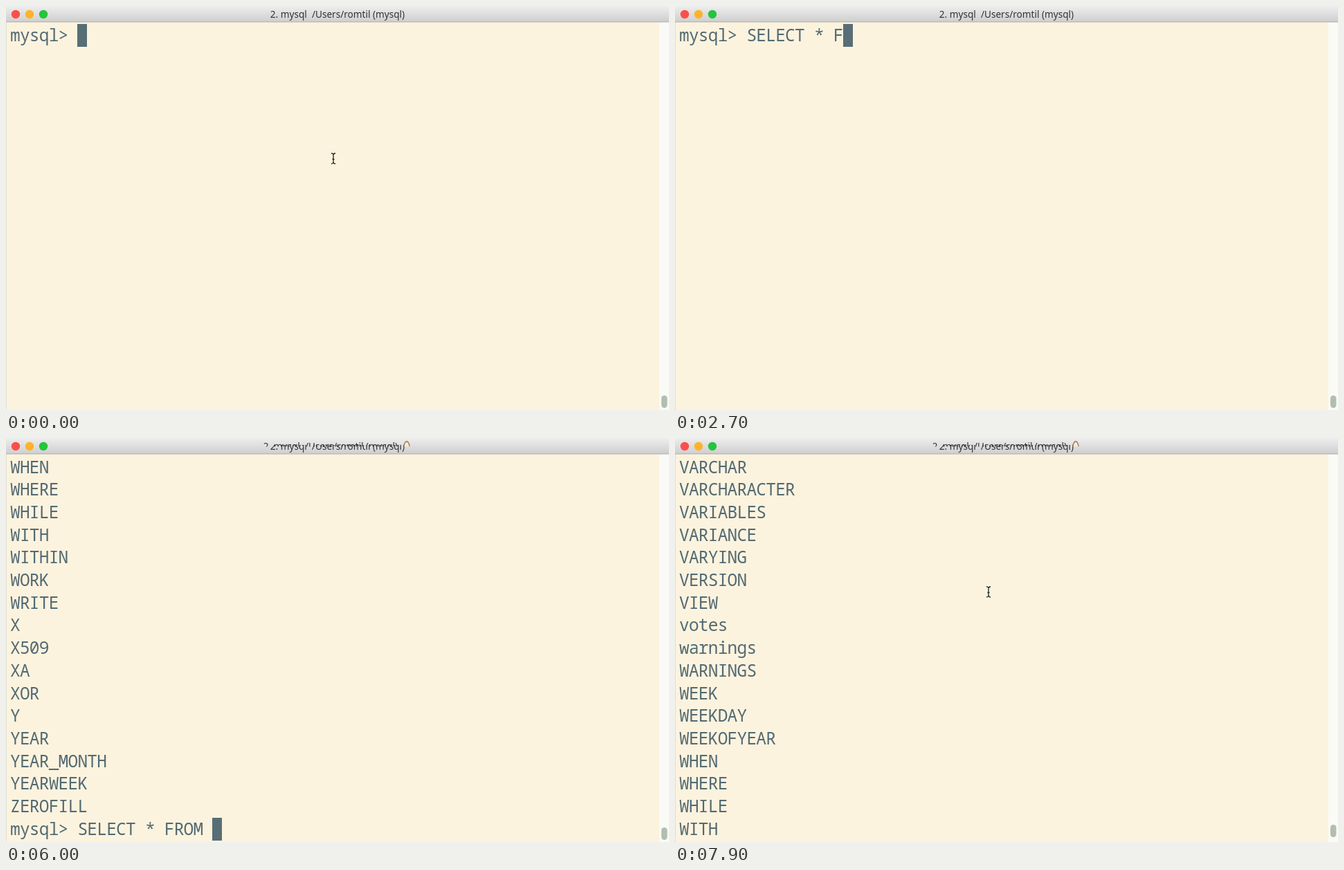
Recreate the animation shown at these times as an HTML page. Size 958 by 584 pixels, loop 8 s.

```html
<!DOCTYPE html>
<html lang="en">
<head>
<meta charset="utf-8">
<title>Terminal</title>
<style>
  html, body { margin: 0; width: 100%; height: 100%; overflow: hidden; background: #fcf3de; }
  svg { display: block; width: 958px; height: 584px; }
  text { white-space: pre; }
  .row { font: 24.5px "Noto Sans Mono", "DejaVu Sans Mono", monospace; letter-spacing: -.78px; fill: #536a73; }
  .title { font: 13.6px "Noto Sans", "Open Sans", sans-serif; fill: #333; text-anchor: middle; }
</style>
</head>
<body>
<svg viewBox="0 0 958 584">
  <defs>
    <linearGradient id="bar" x2="0" y2="1">
      <stop offset="0" stop-color="#eeeeee"/>
      <stop offset="1" stop-color="#cecece"/>
    </linearGradient>
    <clipPath id="upper"><rect x="360" width="230" height="12.5"/></clipPath>
    <clipPath id="lower"><rect x="360" y="10" width="230" height="12"/></clipPath>
  </defs>
  <rect width="958" height="584" fill="#fcf3de"/>
  <rect x="944" y="23" width="14" height="561" fill="#fafaf7"/>
  <rect y="23" width="1" height="561" fill="#dedfd2"/>
  <rect id="thumb" x="947" y="563" width="8.5" height="18" rx="4.2" fill="#b3bfae"/>
  <rect width="958" height="23" fill="url(#bar)"/>
  <rect y="22.5" width="958" height="1" fill="#adadaa"/>
  <circle cx="14" cy="12" r="6.2" fill="#fb4f4b"/>
  <circle cx="34" cy="12" r="6.2" fill="#fdb32a"/>
  <circle cx="54" cy="12" r="6.2" fill="#25c53c"/>
  <text id="plain" class="title" x="479" y="16.5">2. mysql  /Users/romtil (mysql)</text>
  <g id="belled">
    <g clip-path="url(#upper)"><text class="title" x="469" y="16.5">2. mysql  /Users/romtil (mysql)</text></g>
    <g clip-path="url(#lower)"><text class="title" x="479" y="16.5">2. mysql  /Users/romtil (mysql)</text></g>
    <path d="M574.5 12C576 10 575.5 5 579 5S582 10 583.5 12" fill="#f6e9d8" stroke="#a5703f" stroke-width="1.3"/>
  </g>
  <g id="rows"></g>
  <rect id="caret" width="14" height="33" fill="#586e76"/>
  <path id="mouse" d="M-3-7.5Q0-7.5 0-5Q0-7.5 3-7.5M0-5V5M-3 7.5Q0 7.5 0 5Q0 7.5 3 7.5M-1.5 1H1.5" fill="none" stroke="#222" stroke-width="1.3"/>
</svg>
<script>
const LOOP = 8000, LEFT = 6, CELL = 13.92, LINE = 32.7, ROWS = 17;
const PROMPT = 'mysql> ', QUERY = 'SELECT * FROM ';
const ASK = 'Display all 871 possibilities? (y or n) ';
const WORDS = ('VARCHAR VARCHARACTER VARIABLES VARIANCE VARYING VERSION VIEW votes warnings ' +
  'WARNINGS WEEK WEEKDAY WEEKOFYEAR WHEN WHERE WHILE WITH WITHIN WORK WRITE X X509 XA XOR ' +
  'Y YEAR YEAR_MONTH YEARWEEK ZEROFILL').split(' ');

// [time, value] steps, each held until the next
const TYPED = [[0, 0], [500, 1], [600, 2], [800, 3], [900, 4], [1000, 5], [1100, 6], [1300, 7],
  [2400, 8], [2500, 9], [2700, 10], [2900, 12], [3100, 13], [3200, 14]];
const SCROLL = [[0, 0], [7500, 2], [7600, 5], [7700, 9], [7800, 11], [7900, 13]];
const BELL = 3500, ASKED = 4200, LISTED = 5800, MOVE = 6800, REST = 7200;

const $ = id => document.getElementById(id);
const show = (id, on) => { $(id).style.display = on ? '' : 'none'; };
const held = (steps, t) => steps.reduce((v, [at, next]) => t >= at ? next : v, 0);

const lines = Array.from({ length: ROWS }, (_, i) => {
  const el = document.createElementNS('http://www.w3.org/2000/svg', 'text');
  el.setAttribute('class', 'row');
  el.setAttribute('x', LEFT);
  el.setAttribute('y', 50.5 + i * LINE);
  $('rows').append(el);
  return el;
});

function screen(t, back) {
  const input = PROMPT + QUERY.slice(0, held(TYPED, t));
  if (t < ASKED) return [input];
  if (t < LISTED) return [input, ASK];
  const all = [...WORDS, input];
  const top = all.length - ROWS - back;
  return all.slice(top, top + ROWS);
}

function draw(t) {
  const back = held(SCROLL, t);
  const text = screen(t, back);
  lines.forEach((el, i) => {
    const s = text[i] || '';
    if (el.textContent !== s) el.textContent = s;
  });

  const last = text.length - 1;
  show('caret', back === 0);
  $('caret').setAttribute('x', Math.round(LEFT + text[last].length * CELL));
  $('caret').setAttribute('y', Math.round(25.5 + last * LINE));
  $('thumb').setAttribute('y', 563 - back * .3);

  show('plain', t < BELL);
  show('belled', t >= BELL);

  const p = Math.min(1, Math.max(0, (t - MOVE) / (REST - MOVE)));
  const ease = p * (2 - p);
  show('mouse', t < TYPED[1][0] || t >= MOVE);
  $('mouse').setAttribute('transform', `translate(${473 - 20 * ease} ${220.5 + 2 * ease})`);
}

const start = performance.now();
function tick() {
  draw((performance.now() - start) % LOOP);
  requestAnimationFrame(tick);
}
tick();
</script>
</body>
</html>
```
